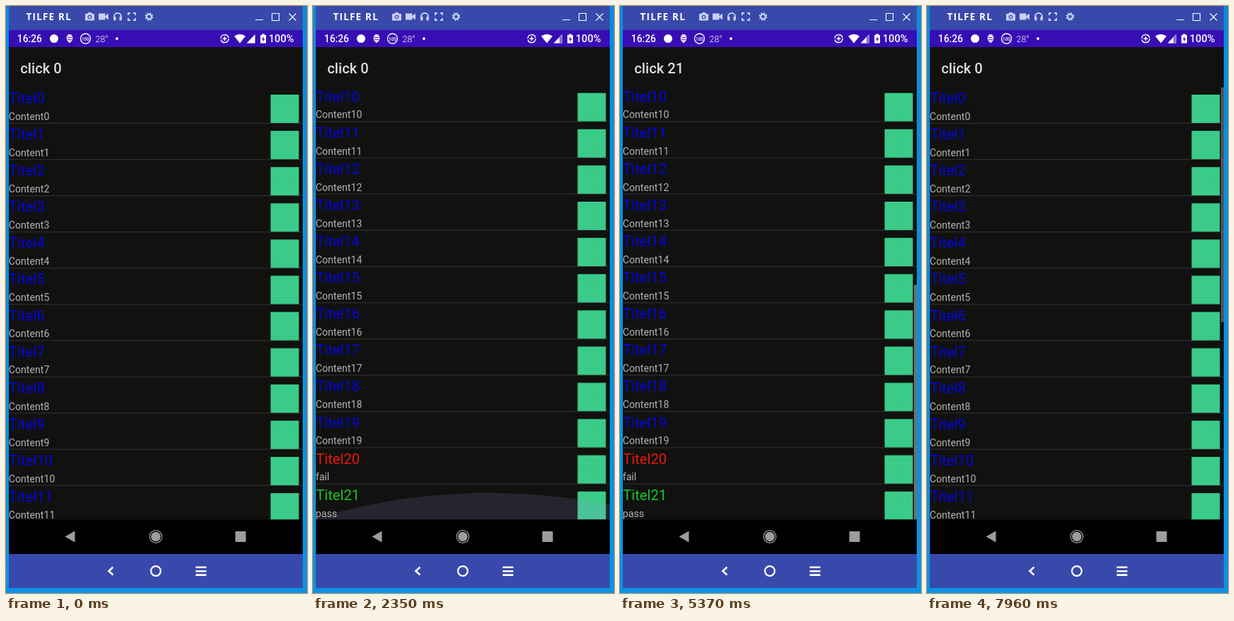
Animation of 426x828 px, one loop 8000 ms. Source, as an HTML page:

```html
<!DOCTYPE html>
<html lang="en">
<head>
<meta charset="utf-8">
<title>List demo</title>
<style>
  html, body { margin: 0; width: 100%; height: 100%; overflow: hidden; background: #0a8fdf; }
  #stage { display: block; width: 426px; height: 828px; font-family: Roboto, sans-serif; }
  .line { fill: none; stroke: #fff; }
  .soft { fill: #c9cfee; }
  .softline { fill: none; stroke: #c9cfee; stroke-width: 2; }
  .title { font-size: 20.2px; }
  .content { font-size: 14.2px; fill: #b3b4b2; }
  .status { font-weight: 500; fill: #fff; }
</style>
</head>
<body>
<svg id="stage" viewBox="0 0 426 828">
  <defs>
    <linearGradient id="desk" x1="0" y1="0" x2="0" y2="1">
      <stop offset="0" stop-color="#0a8cdc"/><stop offset="1" stop-color="#0a93e3"/>
    </linearGradient>
    <g id="icon">
      <rect width="40" height="40" fill="#34c985"/>
      <path id="grid" fill="none" stroke="#fff" stroke-opacity=".13" stroke-width=".5"/>
    </g>
  </defs>

  <rect width="426" height="828" fill="url(#desk)"/>
  <rect x="4" width="416" height="821" fill="#3949ab"/>

  <!-- window bar -->
  <text x="28.5" y="20" font-family="Open Sans, sans-serif" font-size="13.5" font-weight="700" letter-spacing="1.2" fill="#fff">TILFE RL</text>
  <path class="soft" fill-rule="evenodd" d="M112 11h3l1.500-2h4l1.500 2h3v9.500h-13zM118.500 12.500a3 3 0 1 0 .01 0zM118.500 14a1.600 1.600 0 1 1-.01 0z"/>
  <path class="soft" d="M131 10.500h9.500v3.500l4.500-3.500v9l-4.500-3.500v3.500h-9.500z"/>
  <path class="softline" d="M153 16v-1a5 5 0 0 1 10 0v1"/>
  <path class="soft" d="M152 15h3.500v5.500h-2q-1.500 0-1.500-2zM160.500 15h3.500v3.500q0 2-1.500 2h-2z"/>
  <path class="softline" stroke-width="1.800" d="M173 13v-3h3M180 10h3v3M183 17v3h-3M176 20h-3v-3"/>
  <circle class="softline" cx="202.500" cy="15" r="3.300" stroke-width="2.500"/>
  <circle class="softline" cx="202.500" cy="15" r="4.800" stroke-width="1.800" stroke-dasharray="2.200 1.570"/>
  <path class="line" stroke-width="1.100" d="M353 19.500h11M376.500 10.500h10v10h-10zM400.500 10.500l10 10M410.500 10.500l-10 10"/>

  <!-- status bar -->
  <rect x="4" y="34" width="416" height="24" fill="#380db4"/>
  <text class="status" x="15.800" y="51.200" font-size="13.800">16:26</text>
  <circle cx="68" cy="46" r="6" fill="#fff"/>
  <path d="M86.500 42l1.500-2h4l1.500 2 1 3-1 4-3.500 3.500-3.500-3.500-1-4z" fill="#e6def8"/>
  <path d="M87 44.500h6M87 47.500h6" stroke="#380db4" stroke-width=".8"/>
  <circle class="line" cx="112.500" cy="46" r="7" stroke-width="1.300"/>
  <text class="status" x="112.500" y="48.500" font-size="6.500" text-anchor="middle">100</text>
  <text x="126.500" y="50.500" font-size="12.500" font-weight="300" fill="#fff">28°</text>
  <circle cx="157" cy="46" r="1.900" fill="#fff"/>
  <circle class="line" cx="309.500" cy="46" r="5.600" stroke-width="1.500" stroke-dasharray="15.600 2"/>
  <path class="line" stroke-width="1.500" d="M306.500 46h6M309.500 43v6"/>
  <path d="M323 42.500q8-5.500 16 0l-8 10z" fill="#fff"/>
  <path d="M340.500 52.500h12v-12.500z" fill="#fff"/>
  <path id="weak" d="M348.800 52v-7.400l3.200-3.300v10.700z" fill="#380db4" opacity=".6"/>
  <path d="M362 39.500h4v1.500h2v11.500h-8v-11.500h2z" fill="#fff"/>
  <path d="M364.500 43l-2.500 4.200h1.700v3.300l2.500-4.400h-1.700z" fill="#380db4"/>
  <text class="status" x="371.800" y="51.300" font-size="14.600">100%</text>

  <!-- app -->
  <rect x="4" y="58" width="416" height="667" fill="#11110f"/>
  <text id="heading" x="20.300" y="94.500" font-size="20.200" font-weight="500" fill="#dedede"></text>
  <svg x="4" y="114.600" width="416" height="609.900" overflow="hidden">
    <g id="list"></g>
    <rect id="bar" x="412" width="4" fill="#707070"/>
    <ellipse id="topGlow" rx="499" fill="#aa96ec"/>
    <ellipse id="endGlow" rx="499" fill="#aa96ec"/>
  </svg>

  <!-- navigation -->
  <rect x="4" y="724.500" width="416" height="48.500" fill="#000"/>
  <path d="M83.500 748.500l14-8v16z" fill="#9c9c9c"/>
  <circle cx="212" cy="748.500" r="6.800" fill="#9c9c9c"/>
  <circle cx="212" cy="748.500" r="8.800" fill="none" stroke="#9c9c9c" stroke-width="1.200"/>
  <rect x="324.500" y="741" width="15" height="15" rx="1" fill="#9c9c9c"/>
  <path class="line" stroke-width="2.600" d="M151.500 791.500l-6 5.500 6 5.500M268.500 791.800h15M268.500 797.200h15M268.500 802.600h15"/>
  <circle class="line" cx="212" cy="797" r="6.900" stroke-width="2.200"/>
</svg>

<script>
const LOOP = 8000, ROW = 51.1, COUNT = 22, WIDTH = 416, VIEW = 609.9, END = 513.3;
const $ = id => document.getElementById(id);

// bursts of stepped motion: first step, last step, number of steps
const bursts = [
  [500, 1280, 11], [1350, 2120, 11], [2200, 2660, 7], [2830, 3370, 8], [3850, 4620, 11],
  [4680, 5370, 10], [5530, 6320, 11], [6400, 6810, 6], [7960, 7960, 1]
];
const taps = [
  { row: 17, press: 2830, click: 2990, end: 3370 },
  { row: 20, press: 3850, click: 4150, end: 4760 },
  { row: 21, press: 4740, click: 4980, end: 5370 },
  { row: 0, press: 6400, click: 6560, end: 6810 }
];
const scrollKeys = [
  [420, 0], [500, 10], [730, 150], [960, 335], [1150, 425], [1350, 484], [1510, 508], [1620, END],
  [5450, END], [5530, 490], [5690, 130], [5770, 0]
];
const barKeys = [
  [420, 0], [500, 1], [1900, 1], [2120, 0], [2975, 0], [2980, 1],
  [6070, 1], [6320, 0], [6550, 0], [6560, 1], [7900, 1], [7960, .7]
];
const topKeys = [[5690, 0], [5770, .6], [5850, .88], [6000, .8], [6320, 0]];
const endKeys = [[2120, 0], [2200, .15], [2350, .56], [2430, .62], [2660, 0]];

function track(keys, t) {
  const i = keys.findIndex(key => key[0] > t);
  if (i === 0) return keys[0][1];
  if (i < 0) return keys[keys.length - 1][1];
  const [t0, a] = keys[i - 1], [t1, b] = keys[i];
  return a + (b - a) * (t - t0) / (t1 - t0);
}

function snap(t) {
  const burst = bursts.filter(b => b[0] <= t).pop();
  if (!burst) return 0;
  const [start, end, steps] = burst;
  if (steps === 1) return start;
  const gap = (end - start) / (steps - 1);
  return start + gap * Math.min(steps - 1, Math.floor((t - start) / gap + .1));
}

function add(parent, tag, attrs, text = '') {
  const node = document.createElementNS('http://www.w3.org/2000/svg', tag);
  set(node, attrs);
  node.textContent = text;
  return parent.appendChild(node);
}

function set(node, attrs) {
  for (const name in attrs) node.setAttribute(name, attrs[name]);
}

function buildList() {
  let grid = '';
  for (let i = 0; i < 10; i++) {
    const p = (9 + 10 * i) * 40 / 108;
    grid += `M${p} 0v40M0 ${p}h40`;
  }
  $('grid').setAttribute('d', grid);

  for (const tap of taps) {
    const box = add($('list'), 'svg', { y: tap.row * ROW, width: WIDTH, height: ROW, overflow: 'hidden' });
    tap.ripple = add(box, 'circle', { cx: 208, cy: ROW / 2, fill: '#fff' });
  }
  for (let i = 0; i < COUNT; i++) {
    const row = add($('list'), 'g', { transform: `translate(0 ${i * ROW})` });
    const color = { 20: '#ea180c', 21: '#14c824' }[i] || '#0505e0';
    const note = { 20: 'fail', 21: 'pass' }[i] || 'Content' + i;
    add(row, 'text', { class: 'title', x: .3, y: 22.4, fill: color }, 'Titel' + i);
    add(row, 'text', { class: 'content', x: -.3, y: 46.2 }, note);
    if (i < COUNT - 1) add(row, 'rect', { y: 50.2, width: WIDTH, height: 1.2, fill: '#2d2e2d' });
    add(row, 'use', { href: '#icon', x: 370.5, y: 10.4 });
  }
}

function drawGlow(node, size, cx, edge, side) {
  set(node, {
    cx, cy: edge - side * (499 - 66.9) * size, ry: 499 * size,
    opacity: .15 * Math.min(1, size * 2)
  });
}

function render(time) {
  const t = snap(time);
  const scroll = track(scrollKeys, t);
  const total = VIEW + END;
  $('list').setAttribute('transform', `translate(0 ${-scroll})`);
  set($('bar'), { y: scroll * VIEW / total, height: VIEW * VIEW / total, opacity: track(barKeys, t) });
  drawGlow($('topGlow'), track(topKeys, t), 209, 0, 1);
  drawGlow($('endGlow'), track(endKeys, t), 246, VIEW, -1);

  let clicked = 0;
  for (const { row, press, click, end, ripple } of taps) {
    if (t >= click) clicked = row;
    const fade = Math.min(1, (end - t) / (end - click));
    set(ripple, {
      r: Math.max(0, t - press + 70) * .9,
      opacity: t >= press && t < end ? .15 * fade : 0
    });
  }
  $('heading').textContent = 'click ' + clicked;
  const weak = (t >= 2200 && t < 5600) || t >= 6100;
  $('weak').setAttribute('visibility', weak ? 'visible' : 'hidden');
}

buildList();
const begin = performance.now();
function frame() {
  render((performance.now() - begin) % LOOP);
  requestAnimationFrame(frame);
}
frame();
</script>
</body>
</html>
```
